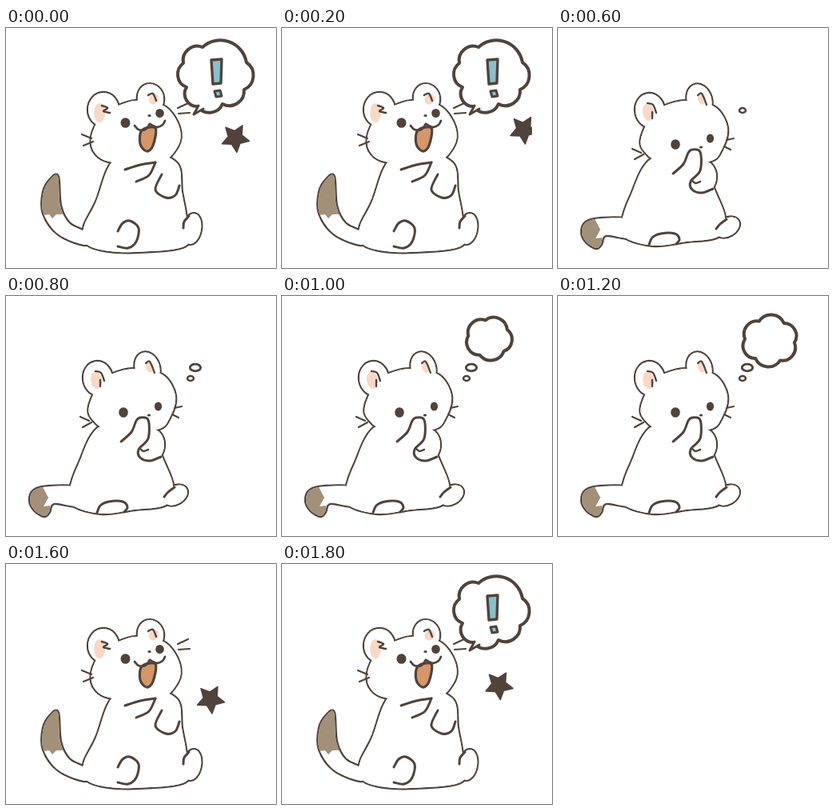
An HTML page for the animation above (2 s loop, 338 by 300 pixels).

```html
<!DOCTYPE html>
<html lang="en">
<head>
<meta charset="utf-8">
<title>Thinking weasel</title>
<style>
html, body { margin: 0; width: 100%; height: 100%; overflow: hidden; background: #fff; }
svg { display: block; width: 338px; height: 300px; }
path { stroke-linecap: round; stroke-linejoin: round; }
</style>
</head>
<body>
<svg id="stage" viewBox="0 0 338 300" xmlns="http://www.w3.org/2000/svg">
  <defs>
    <clipPath id="edge"><rect width="313" height="300"/></clipPath>
    <clipPath id="tipUp"><path d="M0 0H338V227L63 233L58 238L54 233L0 240Z"/></clipPath>
    <clipPath id="tipDown"><path d="M0 0V300H55V262L47 263L53 252L44 235V0Z"/></clipPath>
  </defs>
</svg>
<script>
const INK = '#51433a', FUR = '#fff', TIP = '#a29079', PINK = '#f9d9c5';
const TONGUE = '#d6966a', BLUE = '#86c1ce';
const OUTER = 4.4, INNER = 3;
const NS = 'http://www.w3.org/2000/svg';
const stage = document.getElementById('stage');

function add(parent, tag, attrs = {}) {
  const node = document.createElementNS(NS, tag);
  for (const key in attrs) node.setAttribute(key, attrs[key]);
  return parent.appendChild(node);
}
const parse = text => text.split(' ').map(pair => pair.split(',').map(Number));

// Smooth path through a few key points, open or closed.
function smooth(text, closed) {
  const p = parse(text), n = p.length;
  const at = i => closed ? p[(i + n) % n] : p[Math.max(0, Math.min(n - 1, i))];
  let d = 'M' + p[0];
  for (let i = 0; i < n - (closed ? 0 : 1); i++) {
    const [a, b, c, e] = [-1, 0, 1, 2].map(k => at(i + k));
    const c1 = b.map((v, k) => v + (c[k] - a[k]) / 6);
    const c2 = c.map((v, k) => v - (e[k] - b[k]) / 6);
    d += `C${c1} ${c2} ${c}`;
  }
  return d;
}
const loop = text => smooth(text, true);

const ring = (cx, cy, rx, ry, n, turn) => Array.from({ length: n }, (_, i) => {
  const a = (turn + i * 360 / n) * Math.PI / 180;
  return [cx + rx * Math.cos(a), cy + ry * Math.sin(a)];
});

// Cloud outline: one arc between each pair of notches.
const puffs = p => 'M' + p[0] + p.map((a, i) => {
  const b = p[(i + 1) % p.length];
  const r = Math.hypot(b[0] - a[0], b[1] - a[1]) * .57;
  return `A${r} ${r} 0 0 1 ${b}`;
}).join('') + 'Z';

function egg(cx, cy, rx, ry, tilt = 0) {
  const a = tilt * Math.PI / 180, x = rx * Math.cos(a), y = rx * Math.sin(a);
  const arc = `A${rx} ${ry} ${tilt} 0 1 `;
  return `M${cx - x} ${cy - y}${arc}${cx + x} ${cy + y}${arc}${cx - x} ${cy - y}Z`;
}

const shape = (g, d, fill = INK, width = 0) =>
  add(g, 'path', { d, fill, stroke: width ? INK : 'none', 'stroke-width': width });
const line = (g, text, width = INNER) => shape(g, smooth(text), 'none', width);

// Outlines first, fills on top, so the parts share one contour.
function merge(g, parts) {
  for (const d of parts) shape(g, d, INK, OUTER);
  for (const d of parts) shape(g, d, FUR, 0).setAttribute('transform', 'translate(0 0)');
  for (const d of parts) add(g, 'path', { d, fill: 'none' });
}

// The fills are inset by drawing the outline outside the contour only.
function body(g, tail, clip, parts) {
  for (const d of [tail, ...parts]) shape(g, d, INK, OUTER);
  for (const d of [tail, ...parts]) shape(g, d, FUR);
  shape(g, tail, TIP).setAttribute('clip-path', `url(#${clip})`);
  for (const d of parts) shape(g, d, FUR);
}

function drawHappy(g) {
  body(g, loop('65,186 68,222 79,244 100,256 100,271 66,258 47,232 47,205 56,189'), 'tipUp', [
    egg(122, 102, 19, 21),
    egg(181, 88, 16, 18, -15),
    loop('107,136 120,110 146,95 170,91 200,99 217,124 215,148 190,170 134,168 112,157'),
    loop('134,166 113,217 98,247 98,267 118,277 160,280 225,272 226,240 220,205 214,169 175,155'),
    egg(233, 251, 11, 19, 10)
  ]);

  shape(g, egg(117, 106, 7, 12), PINK);
  line(g, '120,97 127,100 122,104 130,106', 2.6);
  shape(g, egg(185, 89, 6, 7, 40), PINK);
  line(g, '178,84 184,82 188,91', 2.4);

  shape(g, egg(149.5, 118.5, 6, 6.3));
  shape(g, egg(192.5, 106.5, 5.3, 5.5));
  shape(g, egg(179.5, 109.5, 2.2, 1.5));
  shape(g, loop('170,128 168,145 176,154 184,147 187,125'), TONGUE, 3.2);
  line(g, '161,122 166,127 174,127 180,120', 2.8);
  line(g, '180,120 189,124 196,121 199,116', 2.8);

  line(g, '95,133 107,138', 2.2);
  line(g, '97,147 109,142', 2.2);
  line(g, '215,100 228,94', 2.2);
  line(g, '216,107 230,106', 2.2);
  line(g, '149,177 168,171 187,168');
  line(g, '187,168 179,184 163,192');
  line(g, '195,183 187,202 200,212 212,209 217,197');
  line(g, '140,254 146,244 155,241 166,250 163,267 153,275 140,273');
  line(g, '229,235 223,242 222,250');
}

function drawPondering(g) {
  body(g, loop('90,240 55,238 35,243 30,256 36,268 48,275 54,270 60,259 90,262'), 'tipDown', [
    egg(115, 103, 18, 21, -8),
    egg(177, 90, 15, 20, -18),
    loop('104,138 120,106 146,93 170,92 198,100 212,125 205,152 188,167 130,167 109,155'),
    loop('118,163 91,210 80,243 84,262 120,272 160,267 200,261 209,237 195,200 180,160'),
    egg(182, 186, 16, 20),
    egg(212, 249, 16, 11, -30)
  ]);

  shape(g, egg(113, 105, 7, 11, -8), PINK);
  line(g, '112,94 119,96 123,106', 2.3);
  line(g, '118,105 118,113', 2.3);
  shape(g, egg(180, 89, 5, 7, -18), PINK);
  line(g, '175,84 180,82 186,96', 2.2);

  shape(g, egg(147, 145.5, 5.8, 6.3));
  shape(g, egg(190.5, 138, 4.6, 5.6));
  shape(g, egg(179, 149, 2.2, 1.5));

  line(g, '93,151 104,156', 2.2);
  line(g, '96,164 107,158', 2.2);
  line(g, '211,140 220,138', 2.2);
  line(g, '208,148 216,152', 2.2);
  line(g, '144,182 157,170 163,156 168,152 178,155 178,178 166,192 168,202 180,206 194,201');
  line(g, '167,190 172,194 178,192', 2.4);
  line(g, '114,271 118,262 129,257 146,257 152,264 148,270');
  line(g, '198,251 203,245 211,239');
}

function drawShout(g) {
  shape(g, puffs(parse('226,74 222,44 246,24 301,43 298,77 271,95 240,98')), FUR, 4);
  shape(g, 'M241 97L235 108L247 101', FUR, INNER);
  shape(g, 'M257 40L270 39L269 69L259 70Z', BLUE, 3.4);
  shape(g, 'M261 79L268 78L270 85L263 86Z', BLUE, 3);
}

const star = ring(0, 0, 1, 1, 10, -132)
  .map(([x, y], i) => [x, y].map(v => v * (i % 2 ? 9 : 18)));

// Each layer is shown from one beat to another, counted from the cheer.
const layers = [];
function layer(from, to, draw) {
  const node = add(stage, 'g');
  draw(node);
  layers.push({ node, from, to });
  return node;
}
layer(0, 5, drawHappy);
layer(2, 5, drawShout);
layer(6, 9, drawPondering);
layer(6, 9, g => shape(g, egg(231, 103, 4, 3), FUR, 2.5));
layer(7, 9, g => shape(g, egg(237, 89.5, 6.7, 4.3), FUR, 2.8));
layer(8, 8, g => shape(g, puffs(ring(259, 53, 26, 23, 5, -100)), FUR, 4));
layer(9, 9, g => shape(g, puffs(ring(265, 56, 31, 27, 6, -115)), FUR, 4));
const sky = layer(1, 5, () => {});
sky.setAttribute('clip-path', 'url(#edge)');
const flyer = shape(sky, 'M' + star.join('L') + 'Z', INK, 1.5);

const BEAT = 200, BEATS = 10, CHEER = 7;
const start = performance.now();

function tick() {
  const step = Math.floor((performance.now() - start) / BEAT);
  const beat = (step + BEATS - CHEER) % BEATS;
  for (const { node, from, to } of layers)
    node.style.display = beat >= from && beat <= to ? '' : 'none';
  const k = Math.max(0, Math.min(1, (beat - 1) / 4));
  flyer.setAttribute('transform', `translate(${256 + 62 * k} ${122 + 47 * (1 - k) ** 1.6})`);
  requestAnimationFrame(tick);
}
tick();
</script>
</body>
</html>
```
